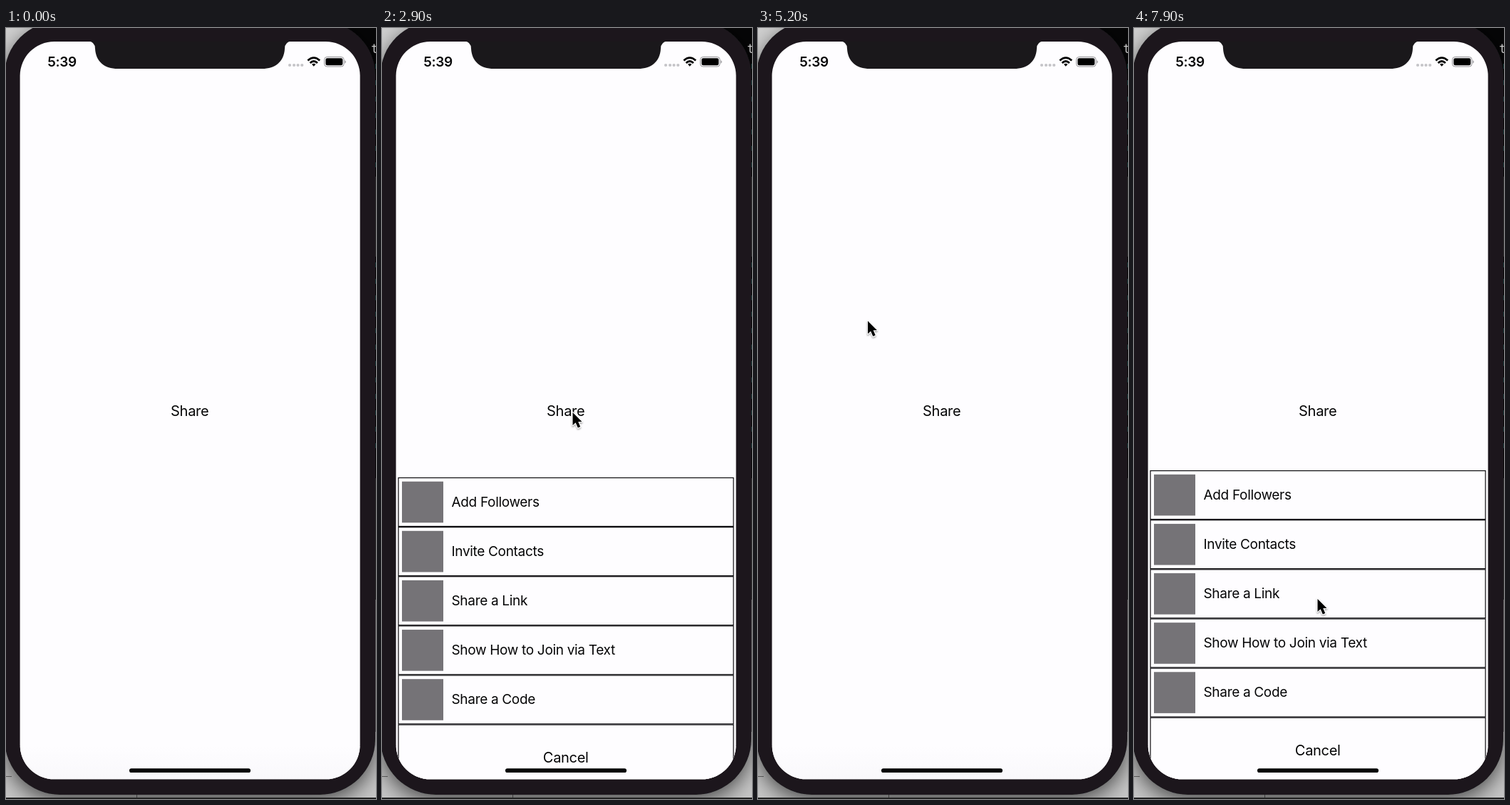
An HTML page that plays this animation: 519x1079 px, repeating every 8 s.

```html
<!DOCTYPE html>
<html lang="en">
<head>
<meta charset="utf-8">
<title>Share sheet</title>
<style>
  html, body { margin: 0; width: 100%; height: 100%; overflow: hidden; background: #000; }
  svg { display: block; }
  text { font-family: Inter, "Liberation Sans", sans-serif; font-size: 19px; letter-spacing: -.32px; fill: #050506; }
  .large { font-size: 20px; }
  .mid { text-anchor: middle; }
  .bold { font-weight: 600; }
  .row { fill: #fefdff; stroke: #0c0b0e; stroke-width: 1.2; }
</style>
</head>
<body>
<svg width="519" height="1079" viewBox="0 0 519 1079">
  <defs>
    <clipPath id="screen"><rect x="19.600" y="19" width="477" height="1032.300" rx="48"/></clipPath>
    <linearGradient id="footer" x2="0" y2="1">
      <stop stop-color="#fefdff"/><stop offset="1" stop-color="#f9f8fb"/>
    </linearGradient>
    <filter id="shadow" x="-50%" y="-50%" width="200%" height="200%">
      <feDropShadow dx="0" dy="1.5" stdDeviation="1.3" flood-opacity=".4"/>
    </filter>
    <filter id="phoneShadow">
      <feDropShadow dx="0" dy="9" stdDeviation="14" flood-opacity=".6"/>
    </filter>
  </defs>

  <!-- desktop behind the phone -->
  <rect width="519" height="1079" fill="#050506"/>
  <rect width="60" height="70" fill="#cfcfcf"/>
  <rect y="980" width="519" height="99" fill="#c6c6c6"/>
  <path d="M0 1047.500H8M183.500 1072V1079" stroke="#666"/>
  <path d="M518.500 208V320M518.500 630V800" stroke="#38383a"/>
  <path d="M518.500 800V985" stroke="#858585"/>
  <path d="M518.500 50V200M518.500 328V600" stroke="#1f4a49" stroke-dasharray="7 16"/>
  <text x="512" y="35" style="font:17px 'DejaVu Sans Mono', monospace;fill:#ddd">t</text>

  <path filter="url(#phoneShadow)" fill="#1a181b"
    d="M-2 66A75 75 0 0 1 73 -9H443A75 75 0 0 1 518 66V995A78 78 0 0 1 440 1073H76A78 78 0 0 1 -2 995Z"/>
  <path d="M0 1078H519" stroke="#222" stroke-width="2"/>

  <g clip-path="url(#screen)">
    <rect x="19" y="19" width="478" height="1033" fill="#fefdff"/>
    <rect x="19" y="1005" width="478" height="47" fill="url(#footer)"/>
    <text class="large mid" x="257.700" y="543">Share</text>
    <g id="sheet"></g>
    <g id="modal">
      <rect x="19" y="19" width="478" height="1033" fill="#fefdff"/>
      <rect x="19" y="19" width="478" height="101" fill="#f6f5f8"/>
      <path d="M19 120.500H497" stroke="#b7b6ba"/>
      <text x="42.500" y="102" style="fill:#1000d6">Cancel</text>
      <text class="mid bold" x="258" y="102" style="letter-spacing:-.45px">Add Followers</text>
    </g>
  </g>

  <path d="M115 18.500Q125 19 125 29C126 47 138 57 157 57H359C378 57 390 47 391 29Q391 19 401 18.500Z" fill="#1a181b"/>
  <rect x="173" y="1036.300" width="170" height="5.760" rx="2.880" fill="#050506"/>

  <!-- status bar -->
  <text class="bold" x="58.300" y="54" style="letter-spacing:-.4px">5:39</text>
  <g fill="#c5c4c8">
    <circle cx="398" cy="52" r="2.100"/><circle cx="404" cy="52" r="2.100"/>
    <circle cx="409.500" cy="52" r="2.100"/><circle cx="415.200" cy="52" r="2.100"/>
  </g>
  <g fill="none" stroke="#000" stroke-width="2.700">
    <path d="M423.300 45.600Q431.700 37.800 440.100 45.600M426.500 48.900Q431.700 44.100 436.900 48.900"/>
    <path d="M429 50.800Q431.700 48.600 434.400 50.800L431.700 53.700Z" fill="#000" stroke="none"/>
  </g>
  <rect x="446.500" y="40.500" width="27.500" height="13.500" rx="3.800" fill="none" stroke="#929195"/>
  <rect x="448.300" y="42.300" width="24" height="10" rx="2.300"/>
  <path d="M475.300 45Q478.300 47.300 475.300 49.800Z" fill="#929195"/>

  <g id="cursor" filter="url(#shadow)">
    <path d="M.5 1V19L4.600 15.200L7.800 22.500L11.200 21L8.200 14H13.500Z" stroke="#fff" stroke-width="2" paint-order="stroke" stroke-linejoin="round"/>
  </g>
</svg>

<script>
const LOOP = 8000, STEP = 100;
const SHEET_TOP = 619, SCREEN_BOTTOM = 1052, ROW = 69.12;
const labels = ['Add Followers', 'Invite Contacts', 'Share a Link', 'Show How to Join via Text', 'Share a Code'];
const [sheet, modal, cursor] = ['sheet', 'modal', 'cursor'].map(id => document.getElementById(id));

// Rows are laid out from y = 0; the group is moved as a whole.
sheet.innerHTML = labels.map((label, i) => {
  const y = i * ROW;
  return `<rect class="row" x="23" y="${y + .6}" width="470" height="${ROW - 1.2}"/>
    <rect x="28" y="${y + 5.8}" width="58" height="57.6" fill="#757377"/>
    <text x="97.500" y="${y + 41}">${label}</text>`;
}).join('') + `<rect class="row" x="23" y="${5 * ROW + .6}" width="470" height="92"/>
  <text class="large mid" x="257.700" y="${5 * ROW + 53.6}">Cancel</text>`;

// time, x, y of the pointer tip
const path = [
  [300, 416, 636], [500, 416, 636], [1200, 264, 543], [1300, 264, 543],
  [1400, 265, 536], [1500, 266, 542], [1600, 266, 542], [1700, 266, 540],
  [1800, 266, 539], [2100, 266, 539], [2900, 267, 537], [3200, 252, 654],
  [4100, 252, 654], [4600, 78, 92], [4800, 78, 92], [5600, 229, 726],
  [5700, 229, 726], [6200, 265, 535], [6500, 265, 534], [6700, 265, 534],
  [7200, 292, 662], [7300, 290, 666], [7900, 257, 798]
];

const progress = (t, start, length) => Math.min(1, Math.max(0, (t - start) / length));
const inOut = u => u < .5 ? 2 * u * u : 1 - 2 * (1 - u) ** 2;
const outQuint = u => 1 - (1 - u) ** 5;
const move = (el, x, y) => el.setAttribute('transform', `translate(${x} ${y})`);

function pointerAt(t) {
  const i = path.findIndex(p => p[0] >= t);
  if (i < 1) return path[0].slice(1);
  const [a, b] = [path[i - 1], path[i]];
  const u = inOut(progress(t, a[0], b[0] - a[0]));
  return [a[1] + (b[1] - a[1]) * u, a[2] + (b[2] - a[2]) * u];
}

function draw(t) {
  const open = inOut(progress(t, 2031, 973)) - inOut(progress(t, 3100, 500)) + inOut(progress(t, 6390, 973));
  move(sheet, 0, SCREEN_BOTTOM - (SCREEN_BOTTOM - SHEET_TOP) * open);

  const shown = outQuint(progress(t, 3867, 500)) - outQuint(progress(t, 4750, 500));
  move(modal, 0, 1034 * (1 - shown));

  cursor.style.visibility = t < 300 ? 'hidden' : 'visible';
  move(cursor, ...pointerAt(t));
}

// The picture advances ten times a second.
function tick() {
  draw(Math.floor(performance.now() % LOOP / STEP) * STEP);
  requestAnimationFrame(tick);
}
tick();
</script>
</body>
</html>
```
